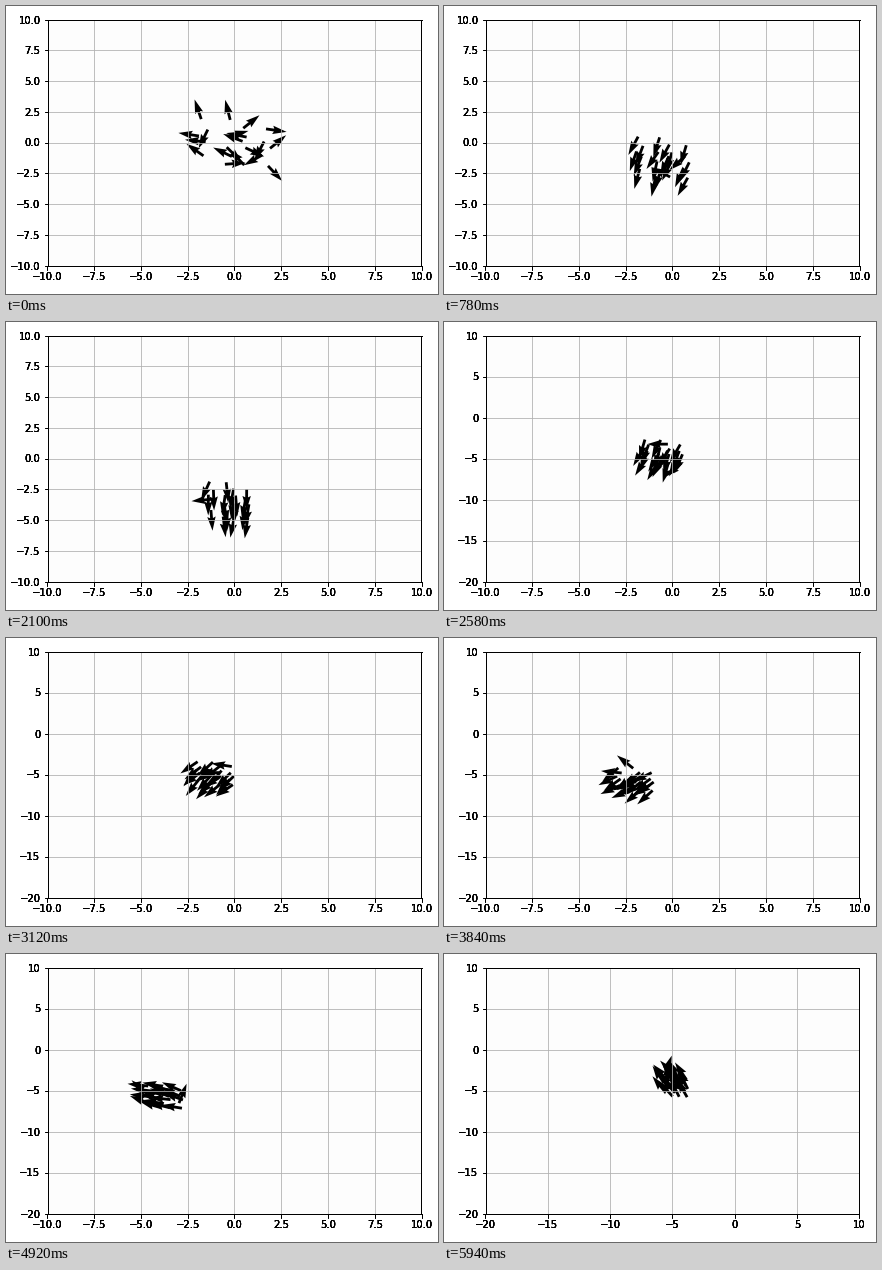
A matplotlib script for the animation above (6000 ms loop, 432 px wide and 288 px high).

```python
import numpy as np
import matplotlib.pyplot as plt
from matplotlib.animation import FuncAnimation

W, H, DPI = 432, 288, 72
FRAMES, INTERVAL = 100, 60
BIRDS = 20
SPEED = 0.1      # distance flown per frame
REACH = 1.9      # half the width of the flock at the start
BOX = [41.5 / W, 28.5 / H, 374 / W, 246 / H]

# Turning points of the flock's heading: frame, degrees
TURNS = [0, 13, 22, 35, 52, 64, 82, 87, 99]
COURSE = [-115, -112, -70, -92, -137, -147, -195, -240, -235]

rng = np.random.default_rng(4)
first = rng.uniform(-180, 180, BIRDS)
phase = rng.permutation(BIRDS) * 2 * np.pi / BIRDS


def scatter():
    """Evenly spread points, drawn together towards the middle."""
    i = np.arange(BIRDS)[:, None]
    u = 2 * ((i * [0.7549, 0.5698] + 0.5) % 1) - 1
    u = u * np.abs(u) ** 0.3
    low, high = u.min(axis=0), u.max(axis=0)
    return REACH * (2 * (u - low) / (high - low) - 1)


home = scatter()
course = np.interp(np.arange(FRAMES), TURNS, COURSE)
rad = np.radians(course)
path = np.cumsum(SPEED * np.column_stack([np.cos(rad), np.sin(rad)]), axis=0)
path -= path[0]


def positions(n):
    spread = np.array([0.5 + 0.5 * np.exp(-n / 18), 0.7 + 0.3 * np.exp(-n / 25)])
    return path[n] + home * spread


def headings(n):
    """Random at first, then aligned, with small sways and rare swerves."""
    fade = np.exp(-n / 3)
    away = (first - course[n] + 180) % 360 - 180
    sway = 9 * np.sin(0.3 * n + 2 * phase)
    swerve = 90 * np.maximum(0, np.sin(0.1 * n + phase)) ** 40
    return np.radians(course[n] + away * fade + (sway - swerve) * (1 - fade))


fig = plt.figure(figsize=(W / DPI, H / DPI), dpi=DPI, facecolor="white")
# Stacked axes deepen the antialiased edges of labels and frame
layers = [fig.add_axes(BOX, facecolor="none") for _ in range(5)]
ax = layers[0]
ax.set_facecolor("#fdfdfd")
ax.grid(True)
a0 = headings(0)
birds = ax.quiver(home[:, 0], home[:, 1], np.cos(a0), np.sin(a0), scale=18)


def fit(name, lowest):
    """Extend an axis downwards once a bird passes half of it."""
    low, step = (-20, 5) if lowest < -5 else (-10, 2.5)
    ticks = np.arange(low, 10 + step / 2, step)
    for layer in layers:
        layer.set(**{name + "ticks": ticks, name + "lim": (low, 10)})


def update(n):
    pos, a = positions(n), headings(n)
    for name, lowest in zip("xy", pos.min(axis=0)):
        fit(name, lowest)
    birds.set_offsets(pos)
    birds.set_UVC(np.cos(a), np.sin(a))
    return [birds]


def reset():
    return update(0)


anim = FuncAnimation(fig, update, frames=FRAMES, init_func=reset,
                     interval=INTERVAL, repeat=True, repeat_delay=0, blit=False)
plt.show()
```
